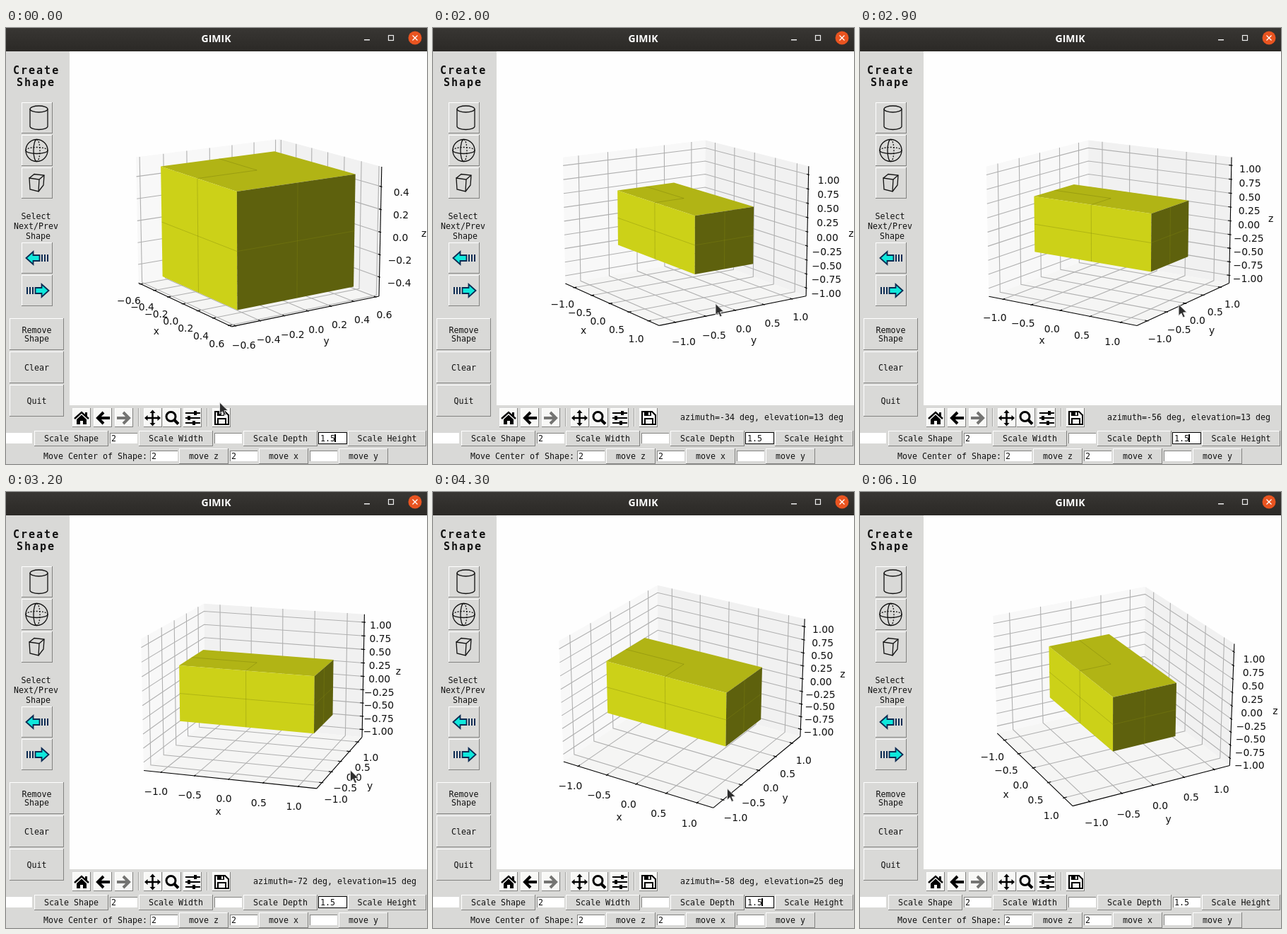
An HTML page with a canvas for the animation above (6900 ms loop, 596x616 px).

```html
<!DOCTYPE html>
<html lang="en">
<head>
<meta charset="utf-8">
<title>GIMIK</title>
<style>
  html, body { margin: 0; width: 100%; height: 100%; overflow: hidden; background: #d9d9d7; }
  canvas { display: block; }
</style>
</head>
<body>
<canvas id="stage" width="596" height="616"></canvas>
<script>
const g = document.getElementById('stage').getContext('2d');
const LOOP = 6900, GREY = '#d9d9d7', INK = '#111';
const MONO = '11.63px "DejaVu Sans Mono", monospace';
const SANS = '13.89px "DejaVu Sans", sans-serif';

// ---------- drawing helpers ----------
function rect(x, y, w, h, color) {
  g.fillStyle = color;
  g.fillRect(x, y, w, h);
}

function path(pts, { fill, stroke, width = 1, close = !!fill, dash = [] }) {
  g.beginPath();
  pts.forEach(p => g.lineTo(p[0], p[1]));
  if (close) g.closePath();
  paint(fill, stroke, width, dash);
}

function oval(x, y, rx, ry, { from = 0, to = 2 * Math.PI, fill, stroke, width = 1, dash = [] }) {
  g.beginPath();
  g.ellipse(x, y, rx, ry, 0, from, to);
  paint(fill, stroke, width, dash);
}

function paint(fill, stroke, width, dash) {
  if (fill) { g.fillStyle = fill; g.fill(); }
  if (stroke) {
    g.strokeStyle = stroke;
    g.lineWidth = width;
    g.setLineDash(dash);
    g.stroke();
    g.setLineDash([]);
  }
}

function text(str, x, y, { font = MONO, align = 'left', color = INK, spacing = 0 } = {}) {
  g.font = font;
  g.textAlign = align;
  g.fillStyle = color;
  g.letterSpacing = spacing + 'px';
  g.fillText(str, x, y);
  g.letterSpacing = '0px';
}

function button(x, y, w, h, label, face = GREY) {
  rect(x, y, w, h, '#828280');
  rect(x, y, w - 1, h - 1, '#fff');
  rect(x + 1, y + 1, w - 2, h - 2, face);
  if (!label) return;
  const lines = label.split('\n');
  lines.forEach((s, i) =>
    text(s, x + w / 2, y + h / 2 + 4 + (i - (lines.length - 1) / 2) * 12, { align: 'center' }));
}

function entry(x, y, value = '', focused = false) {
  if (focused) rect(x - 1, y - 1, 41, 17, '#000');
  rect(x, y, 39, 15, '#fff');
  if (!focused) {
    rect(x, y, 39, 1, '#828280');
    rect(x, y, 1, 15, '#828280');
  }
  text(value, x + 2, y + 12);
}

// ---------- window chrome ----------
function titleBar() {
  const shade = g.createLinearGradient(0, 0, 0, 33);
  shade.addColorStop(0, '#383633');
  shade.addColorStop(1, '#2b2926');
  rect(0, 0, 596, 33, shade);
  text('GIMIK', 297.5, 20, { font: 'bold 14px "Open Sans", sans-serif', align: 'center', color: '#fff' });
  rect(507, 16, 8, 1.5, '#eee');
  g.strokeStyle = '#eee';
  g.lineWidth = 1.2;
  g.strokeRect(541.5, 10.5, 7, 7);
  oval(579, 14, 9.5, 9.5, { fill: '#e95420' });
  path([[575.5, 10.5], [582.5, 17.5]], { stroke: '#fff', width: 1.3 });
  path([[582.5, 10.5], [575.5, 17.5]], { stroke: '#fff', width: 1.3 });
}

function blockArrow(x, y, dir) {
  const at = (dx, dy) => [x + dir * dx, y + dy];
  path([at(-16, 0), at(-6, -9), at(-6, -4), at(3, -4), at(3, 4), at(-6, 4), at(-6, 9)],
    { fill: '#0fe8dc', stroke: '#0b2a52', width: 1.8 });
  for (const d of [6.5, 10.5, 14.5]) path([at(d, -5), at(d, 5)], { stroke: '#0b2a52', width: 2 });
}

function sidebar() {
  const bold = { font: 'bold 15px "DejaVu Sans Mono", monospace', spacing: 2 };
  text('Create', 10, 65, bold);
  text('Shape', 15, 82, bold);
  [105, 151, 197, 303, 349].forEach(y => button(22, y, 44, 44));

  const line = { stroke: INK, width: 1.3 };
  oval(46.5, 114.5, 12.5, 4.5, line);
  oval(46.5, 139, 12.5, 4.5, { ...line, to: Math.PI });
  path([[34, 114.5], [34, 139]], line);
  path([[59, 114.5], [59, 139]], line);

  const dashed = { ...line, dash: [2, 2] }, q = Math.PI / 2;
  oval(43.5, 173, 15.5, 15.5, line);
  oval(43.5, 173, 15.5, 4.5, { ...line, to: 2 * q });
  oval(43.5, 173, 15.5, 4.5, { ...dashed, from: 2 * q });
  oval(43.5, 173, 4.5, 15.5, { ...line, from: q, to: 3 * q });
  oval(43.5, 173, 4.5, 15.5, { ...dashed, from: -q, to: q });

  path([[33, 212], [47, 214], [46, 231], [34, 228]], { ...line, close: true });
  path([[33, 212], [40, 206.5], [54, 208], [53, 222], [46, 231]], line);
  path([[47, 214], [54, 208]], line);

  ['Select', 'Next/Prev', 'Shape'].forEach((s, i) =>
    text(s, i < 2 ? 42.5 : 45.5, 270 + 14 * i, { align: 'center' }));
  blockArrow(44.5, 325, 1);
  blockArrow(44.5, 371, -1);
  ['Remove\nShape', 'Clear', 'Quit'].forEach((s, i) => button(5, 410 + 47 * i, 77, 45, s));
}

function toolbar() {
  [94, 124, 154, 195, 222, 251, 292].forEach(x => button(x, 537, 26, 27, '', '#f8f8f6'));
  [187, 284].forEach(x => { rect(x, 537, 1, 26, '#a5a5a3'); rect(x + 1, 537, 1, 26, '#f4f4f2'); });

  path([[97, 552], [107, 543], [117, 552]], { stroke: '#000', width: 2.4 });
  rect(112, 543, 3, 6, '#000');
  path([[100, 553], [107, 546.5], [114, 553], [114, 560], [109, 560], [109, 555], [105, 555], [105, 560], [100, 560]],
    { fill: '#000' });

  for (const [x, dir, color] of [[137, 1, '#000'], [167, -1, '#747472']]) {
    path([[x + 10 * dir, 551], [x - 7 * dir, 551]], { stroke: color, width: 4 });
    path([[x + dir, 543], [x - 7 * dir, 551], [x + dir, 559]], { stroke: color, width: 4 });
  }

  for (let i = 0; i < 4; i++) {
    const c = Math.cos(i * Math.PI / 2), s = Math.sin(i * Math.PI / 2);
    const at = (a, b) => [207.5 + a * c - b * s, 551 + a * s + b * c];
    path([at(0, -1.3), at(7, -1.3), at(7, -4), at(11.5, 0), at(7, 4), at(7, 1.3), at(0, 1.3)], { fill: '#000' });
  }

  oval(233.5, 549, 6.5, 6.5, { stroke: '#000', width: 3 });
  path([[238, 553.5], [244, 559.5]], { stroke: '#000', width: 4 });

  [[544, 268], [551, 259], [558, 266]].forEach(([y, knob]) => {
    rect(254, y - 1, 21, 2, '#000');
    rect(knob - 2, y - 3, 4, 6, '#000');
  });

  path([[296, 542], [310, 542], [315, 547], [315, 560], [296, 560]],
    { stroke: '#000', width: 2, close: true });
  rect(299, 542, 10, 6, '#000');
  rect(305, 543, 2, 4, '#f4f4f2');
  g.strokeStyle = '#000';
  g.lineWidth = 2;
  g.strokeRect(300, 552, 11, 8);
}

function forms(hover, focused, caret) {
  rect(0, 572, 37, 15, '#fff');
  entry(147, 572, '2');
  entry(295, 572);
  entry(443, 572, '1.5', focused);
  if (caret) rect(465, 574, 2, 11, '#000');
  ['Scale Shape', 'Scale Width', 'Scale Depth', 'Scale Height'].forEach((s, i) =>
    button(40 + 148 * i, 569, i < 3 ? 105 : 111, 22, s, hover && i === 1 ? '#ececec' : GREY));

  text('Move Center of Shape:', 53, 609);
  ['z', 'x', 'y'].forEach((axis, i) => {
    entry(204 + 113 * i, 597, i < 2 ? '2' : '');
    button(245 + 113 * i, 594, 70, 22, 'move ' + axis);
  });
}

// ---------- 3D plot ----------
const HALF = [0.5714, 0.5714, 0.4286];          // half size of the data box
const EDGE = HALF.map(h => h * 25 / 24);        // half size of the panes
const AXES = [                                  // sides of the box each axis runs along
  { name: 'x', side: [0, -1, -1], tickDir: 1 },
  { name: 'y', side: [1, 0, -1], tickDir: 0 },
  { name: 'z', side: [1, 1, 0], tickDir: 0 },
];

function camera(az, el) {
  const a = az * Math.PI / 180, e = el * Math.PI / 180;
  const ca = Math.cos(a), sa = Math.sin(a), ce = Math.cos(e), se = Math.sin(e);
  return ([x, y, z]) => {
    const k = 2081 / (10 - (ce * (x * ca + y * sa) + se * z));
    return [355.2 + k * (y * ca - x * sa), 280.3 - k * (ce * z - se * (x * ca + y * sa))];
  };
}

function plot(az, el, size, stretch) {
  const project = camera(az, el);
  const draw = (pts, style) => path(pts.map(project), style);
  const [ex, ey, ez] = EDGE;
  const limit = [1.21 * size, 1.21 * size, 1.1 * size];

  draw([[-ex, -ey, -ez], [-ex, ey, -ez], [-ex, ey, ez], [-ex, -ey, ez]], { fill: '#f8f8f8' });
  draw([[-ex, ey, -ez], [ex, ey, -ez], [ex, ey, ez], [-ex, ey, ez]], { fill: '#f1f1f1' });
  draw([[-ex, -ey, -ez], [ex, -ey, -ez], [ex, ey, -ez], [-ex, ey, -ez]], { fill: '#f5f5f4' });

  AXES.forEach(({ name, side, tickDir }, i) => {
    const step = size < 1 ? 0.2 : i < 2 ? 0.5 : 0.25;
    const digits = size < 1 || i < 2 ? 1 : 2;
    const count = Math.floor(limit[i] / step);
    // point on the axis edge, pushed out by a share of the data range
    const onEdge = (v, push) =>
      side.map((s, j) => s ? s * (EDGE[j] + push * 2 * HALF[j]) : v);

    for (let n = -count; n <= count; n++) {
      const v = n * step / limit[i] * HALF[i];
      const grid = [
        [[v, ey, ez], [v, ey, -ez], [v, -ey, -ez]],
        [[-ex, v, ez], [-ex, v, -ez], [ex, v, -ez]],
        [[-ex, -ey, v], [-ex, ey, v], [ex, ey, v]],
      ][i];
      draw(grid, { stroke: '#b0b0b0', width: 1.1 });

      const tick = [-0.2, 0.1].map(k => {
        const p = onEdge(v, 0);
        p[tickDir] += side[tickDir] * k * HALF[tickDir] / 6;
        return p;
      });
      draw(tick, { stroke: '#000', width: 1.1 });

      const [x, y] = project(onEdge(v, 0.083));
      const label = (n < 0 ? '\u2212' : '') + Math.abs(n * step).toFixed(digits);
      text(label, x, y + 11.4, { font: SANS, align: 'center' });
    }
    draw([-EDGE[i], EDGE[i]].map(v => onEdge(v, 0)), { stroke: '#000', width: 1.1 });
    const [x, y] = project(onEdge(0, 0.1805));
    text(name, x, y + 4, { font: SANS, align: 'center' });
  });

  const [bx, by, bz] = [stretch, 0.5, 0.5].map((h, i) => h / limit[i] * HALF[i]);
  const seam = { stroke: 'rgba(70,74,0,0.3)', width: 0.7 };
  const light = { stroke: 'rgba(150,154,20,0.35)', width: 0.7 };
  draw([[-bx, -by, bz], [bx, -by, bz], [bx, by, bz], [-bx, by, bz]], { fill: '#b1b415' });
  draw([[-bx, 0, bz], [0, 0, bz], [0, -by, bz]], seam);
  draw([[-bx, -by, -bz], [bx, -by, -bz], [bx, -by, bz], [-bx, -by, bz]], { fill: '#ccd118' });
  draw([[-bx, -by, 0], [bx, -by, 0]], seam);
  draw([[0, -by, -bz], [0, -by, bz]], seam);
  draw([[bx, -by, -bz], [bx, by, -bz], [bx, by, bz], [bx, -by, bz]], { fill: '#5e610d' });
  draw([[bx, -by, 0], [bx, by, 0]], light);
  draw([[bx, 0, -bz], [bx, 0, bz]], light);
}

// ---------- motion: [time, ...values] ----------
const VIEW = [
  [0, -34.1, 14], [1900, -34.1, 13.8], [2500, -35.3, 11.4], [3200, -72, 15], [3700, -71, 17],
  [4000, -71, 17], [4300, -58, 25.2], [4700, -24.3, 25.7], [5000, -28, 24.7],
];
const POINTER = [
  [0, 302, 529], [500, 246, 571], [700, 240, 575], [900, 243, 574], [1300, 289, 538],
  [1500, 386, 379], [1700, 399, 389], [1900, 399, 390], [2500, 402, 387], [3200, 487, 393],
  [3700, 484, 398], [4000, 484, 398], [4300, 416, 419], [4700, 378, 419], [5000, 386, 417],
  [5200, 384, 400], [5300, 388, 369],
];

function sample(keys, t) {
  const i = keys.findIndex(k => k[0] > t);
  if (i < 0) return keys[keys.length - 1].slice(1);
  const a = keys[i - 1], b = keys[i], f = (t - a[0]) / (b[0] - a[0]);
  return a.slice(1).map((v, j) => v + (b[j + 1] - v) * f);
}

function arrowPointer(x, y) {
  path([[0, 0], [0, 16], [3.8, 12.6], [6.4, 18.5], [9, 17.3], [6.4, 11.6], [11.5, 11.3]]
    .map(([dx, dy]) => [x + 0.5 + dx, y + dy]), { fill: '#2d2d2d', stroke: '#e8e8e8', width: 0.9 });
}

function status(t, az, el) {
  if (t >= 1900 && t < 5200) return `azimuth=${Math.round(az)} deg, elevation=${Math.round(el)} deg`;
  if (t >= 1500 && t < 1900) return 'x=0.63, y=-0.12, z=-0.57';
  if (t >= 5200 && t < 5400) return 'x=1.26, y=-0.14, z=-1.15';
  return '';
}

function render(now) {
  const t = Math.floor(now % LOOP / 100) * 100;   // the screen refreshes ten times a second
  const [az, el] = sample(VIEW, t);
  const [px, py] = sample(POINTER, t);
  const focused = t < 6100;
  const caret = focused && (t + 500) % 950 < 600;
  const hover = t < 1500 && px > 188 && px < 293 && py > 568;
  const size = t < 1900 ? 0.5 : 1;

  rect(0, 0, 596, 616, GREY);
  rect(90, 33, 506, 500, '#fefefe');
  plot(az, el, size, size);
  titleBar();
  sidebar();
  toolbar();
  text(status(t, az, el), 581, 554, { align: 'right' });
  forms(hover, focused, caret);
  if (t < 5400) arrowPointer(px, py);
}

function loop() {
  render(performance.now());
  requestAnimationFrame(loop);
}
loop();
</script>
</body>
</html>
```
